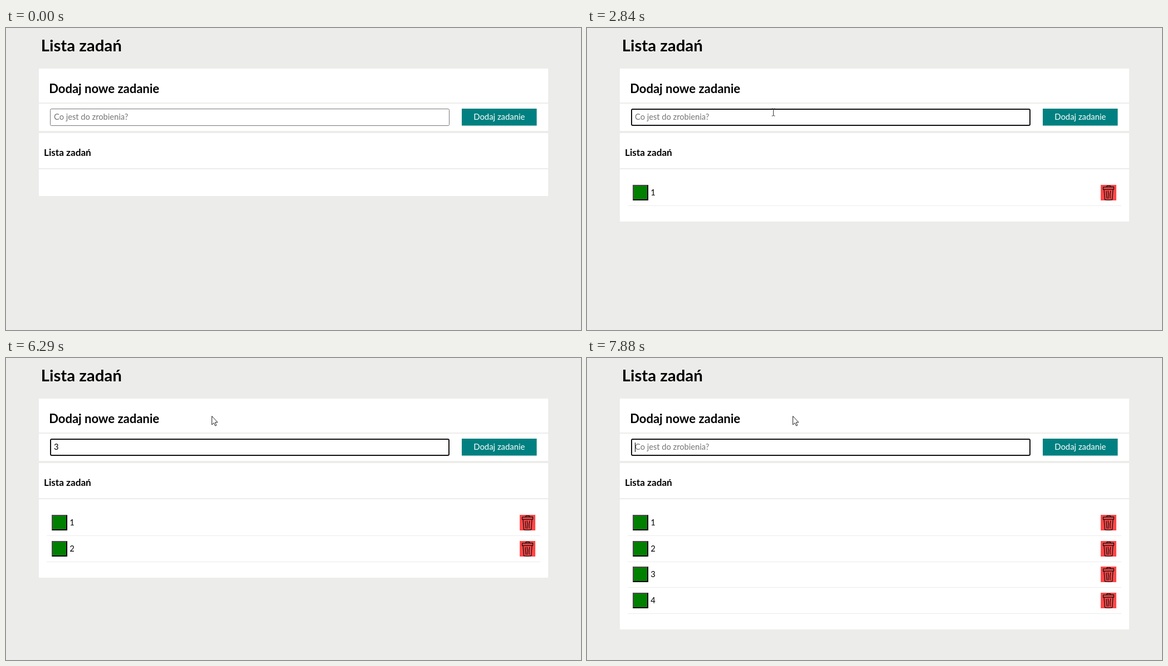
Animation, 1032 px wide and 543 px high, one loop 8000 ms. Source, as an HTML page:

```html
<!DOCTYPE html>
<html lang="pl">
<head>
<meta charset="utf-8">
<title>Lista zadań</title>
<style>
  html, body { margin: 0; width: 100%; height: 100%; overflow: hidden; background: #ececea; }
  svg { display: block; width: 1032px; height: 543px; font-family: Lato, sans-serif; font-size: 14.67px; }
  .head { font-weight: 700; }
  .rule { fill: #ececea; }
  .line { fill: none; stroke: #111; stroke-width: 1.3; stroke-linecap: round; stroke-linejoin: round; }
</style>
</head>
<body>
<svg viewBox="0 0 1032 543">
  <defs>
    <g id="tick">
      <rect width="28" height="28" fill="#008000"/>
      <path d="M0 28V0H28L26 2H2V26Z" fill="#4c4c4c"/>
      <path d="M28 0V28H0L2 26H26V2Z" fill="#000"/>
    </g>
    <g id="bin">
      <rect width="28" height="28" fill="#ff4747"/>
      <g class="line">
        <path d="M4.5 4.2L23.5 3.6V8L4.5 8.4ZM10.5 3.6L11.5 1.6H17L18 3.4"/>
        <path d="M6 8.6L7.5 26.6Q14 28 20.6 26.6L22 8.4"/>
        <path d="M10 11.5L11 24M13.2 11Q14.6 17 13.4 24.5M17.8 11Q16 17 17 24"/>
      </g>
    </g>
  </defs>

  <rect width="1032" height="543" fill="#ececea"/>
  <text class="head" x="62.8" y="42" font-size="29.33">Lista zadań</text>

  <rect x="59" y="73" width="914" height="112" fill="#fff"/>
  <text class="head" x="77.2" y="117" font-size="22">Dodaj nowe zadanie</text>
  <rect class="rule" x="59" y="134" width="914" height="2"/>
  <rect id="field" fill="#fff"/>
  <text id="entry" x="86" y="165"></text>
  <rect id="caret" y="152" width="1" height="17"/>
  <rect x="818" y="145" width="134.5" height="30.5" fill="#008080"/>
  <text x="885.3" y="165" font-size="14.85" fill="#fff" text-anchor="middle">Dodaj zadanie</text>

  <rect id="panel" x="59" y="189" width="914" fill="#fff"/>
  <text class="head" x="68" y="230" font-size="17.16">Lista zadań</text>
  <rect class="rule" x="59" y="252" width="914" height="2"/>
  <g id="rows"></g>

  <circle id="halo" cx="333" cy="151" r="11.2" fill="#f4ee00" fill-opacity=".58"/>
  <g id="beam" class="line" style="stroke-width:1;stroke:#333">
    <path d="M-2.5 -6.5H-.8L0 -5.7L.8 -6.5H2.5M0 -5.7V5.7M-2.5 6.5H-.8L0 5.7L.8 6.5H2.5"/>
  </g>
  <path id="arrow" d="M0 0V15.5L3.6 12.2L6 17.5L8.2 16.5L5.9 11.2H10.4Z" fill="#fff" stroke="#222"/>
</svg>

<script>
const LOOP = 8000, FRAME = 70, PITCH = 46.6;
const FOCUS = 1180, RELEASE = 1720;

// When each task is typed and when it is added to the list
const tasks = [
  { typed: 1910, added: 2840 },
  { typed: 4570, added: 5100 },
  { typed: 5760, added: 6360 },
  { typed: 6820, added: 7420 }
];
const caretOn = [
  [FOCUS, RELEASE], [1910, 2440], [2970, 3500], [4030, 5100],
  [5630, 6290], [6820, 7350], [7880, LOOP]
];

const el = id => document.getElementById(id);
const set = (node, attrs) => {
  for (const name in attrs) node.setAttribute(name, attrs[name]);
};
const show = (node, on) => set(node, { visibility: on ? 'visible' : 'hidden' });
const within = (t, from, to) => t >= from && t < to;

el('rows').innerHTML = tasks.map((task, i) => {
  const at = y => Math.round(y + PITCH * i);
  return `<g>
    <use href="#tick" x="82" y="${at(282)}"/>
    <text x="114.3" y="${at(301)}">${i + 1}</text>
    <use href="#bin" x="922" y="${at(282)}"/>
    <rect x="73" y="${at(319)}" width="886" height="1" fill="#ebebeb"/>
  </g>`;
}).join('');
const rows = [...el('rows').children];

const easeOut = p => 1 - (1 - p) * (1 - p);
const easeInOut = p => p * p * (3 - 2 * p);

function glide(t, start, steps, from, to, ease) {
  const p = Math.min(Math.max(Math.floor((t - start) / FRAME) / steps, 0), 1);
  return from.map((v, i) => Math.round(v + (to[i] - v) * ease(p)));
}

function drawPointer(t) {
  const [x, y] = t < 3960
    ? glide(t, 970, 3, [348, 86], [334, 151], easeOut)
    : glide(t, 3960, 3, [334, 151], [369, 104], easeInOut);
  const overField = y > 136;
  for (const id of ['beam', 'arrow']) {
    set(el(id), { transform: `translate(${x + .5} ${y + .5})` });
    show(el(id), t >= 970 && (id === 'beam') === overField);
  }
  show(el('halo'), within(t, FOCUS, RELEASE));
}

function drawField(t) {
  set(el('field'), t >= FOCUS
    ? { x: 80, y: 146, width: 715, height: 29, rx: 2, stroke: '#101010', 'stroke-width': 2 }
    : { x: 79.5, y: 145.5, width: 716, height: 30, rx: 2, stroke: '#767676', 'stroke-width': 1 });
  const typing = tasks.findIndex(task => within(t, task.typed, task.added));
  const empty = typing < 0;
  el('entry').textContent = empty ? 'Co jest do zrobienia?' : typing + 1;
  set(el('entry'), { fill: empty ? '#757575' : '#000' });
  set(el('caret'), { x: empty ? 86 : 94 });
  show(el('caret'), caretOn.some(([from, to]) => within(t, from, to)));
}

function drawList(t) {
  const count = tasks.filter(task => t >= task.added).length;
  rows.forEach((row, i) => show(row, i < count));
  set(el('panel'), { height: Math.round(301.6 + PITCH * count) - 189 });
}

function draw(t) {
  drawPointer(t);
  drawField(t);
  drawList(t);
}

function tick() {
  draw(performance.now() % LOOP);
  requestAnimationFrame(tick);
}
tick();
</script>
</body>
</html>
```
